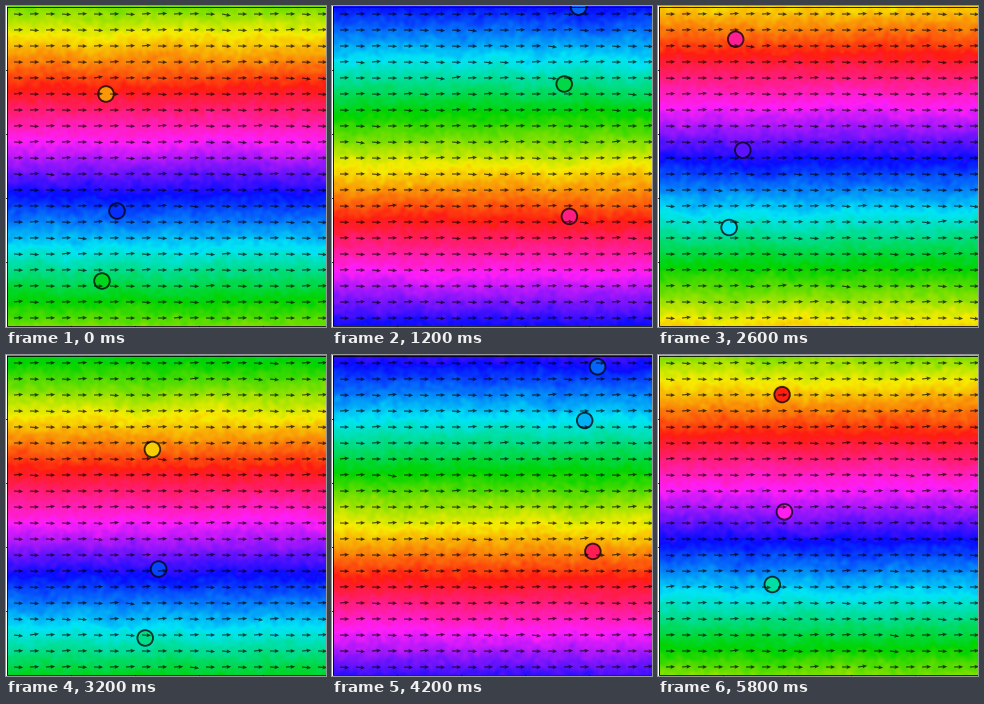
These frames come from a looping animation (320 px wide and 321 px high, 5.9 s). A matplotlib script:

```python
import numpy as np
import matplotlib.pyplot as plt
from matplotlib.animation import FuncAnimation
from matplotlib.patches import Circle

W, H, N = 320, 321, 59
SIZE = 320
RED_Y, SCROLL = 82, 11     # start of the red band, its fall in px per step
DRIFT_X, DRIFT_Y = 11.4, 10.3

WHEEL = np.array([(255, 28, 18), (246, 236, 0), (0, 212, 0), (0, 228, 245),
                  (8, 12, 255), (255, 30, 248), (255, 28, 18)]) / 255

# start, velocity, growing sway, and hue swing (size, period, peak)
TRACERS = [
    dict(x=111, y=205, vx=11.3, vy=10.15, sway=0.5, swing=(0.08, 10, 58)),
    dict(x=96, y=275, vx=11.35, vy=10.25, sway=0, swing=(-0.09, 12, 58)),
    dict(x=100, y=88, vx=11.45, vy=10.2, sway=0, swing=(0.14, 16.5, 51)),
]

rng = np.random.default_rng(4)


def smooth_noise(scale):
    """Periodic Gaussian noise with unit deviation."""
    f = np.fft.fftfreq(SIZE)
    blur = np.exp(-2 * (np.pi * scale) ** 2 * (f[:, None] ** 2 + f ** 2))
    field = np.fft.ifft2(np.fft.fft2(rng.normal(size=(SIZE, SIZE))) * blur).real
    field -= field.mean()
    return field / field.std()


def wheel(hue):
    pos = np.mod(hue, 1) * 6
    return np.stack([np.interp(pos, range(7), c) for c in WHEEL.T], axis=-1)


def band_hue(y, k):
    return (RED_Y + SCROLL * k - y) / SIZE


def tracer_state(p, k):
    x = p["x"] + p["vx"] * k
    y = p["y"] + p["vy"] * k - p["sway"] * k * np.sin(2 * np.pi * k / N)
    size, period, peak = p["swing"]
    swing = size * np.cos(2 * np.pi * (k - peak) / period)
    return x % SIZE, y % SIZE, swing


hue_noise = 0.006 * smooth_noise(2) + 0.004 * smooth_noise(12)
tilt_noise = 0.05 * smooth_noise(5)
rows = np.arange(SIZE)[:, None] + 0.5
cells = np.arange(8, SIZE, 16)
gx, gy = np.meshgrid(cells, cells)

fig = plt.figure(figsize=(W / 100, H / 100), dpi=100, facecolor="white")
ax = fig.add_axes([0, 0, 1, 1])
ax.set(xlim=(0, W), ylim=(H, 0))
ax.axis("off")

field = ax.imshow(np.zeros((SIZE, SIZE, 3)), extent=(1, W, SIZE, 0),
                  interpolation="nearest", aspect="auto", zorder=1)
rings = [ax.add_patch(Circle((0, 0), 7.8, ec=(0, 0, 0, 0.75), lw=1.35, zorder=2))
         for _ in TRACERS]
arrows = ax.quiver(gx, gy, np.ones(gx.shape), np.zeros(gx.shape),
                   angles="xy", scale_units="xy", scale=1, units="dots",
                   width=1.1, headwidth=3.6, headlength=4.2,
                   headaxislength=3.8, color="black", alpha=0.7, zorder=3)

# frame and outer ticks
edge = dict(color="black", lw=0.6, zorder=4)
ax.plot([1, 319.5, 319.5, 1, 1], [0.5, 0.5, 319.5, 319.5, 0.5], **edge)
for t in range(1, 5):
    ax.plot([64 * t + 1] * 2, [319.5, H], **edge)
    ax.plot([0, 1], [64 * t] * 2, **edge)


def update(k):
    shift = round(DRIFT_Y * k), round(DRIFT_X * k)
    hue = band_hue(rows, k) + np.roll(hue_noise, shift, (0, 1))
    field.set_data(wheel(hue))

    tilt = np.roll(tilt_noise, shift, (0, 1))[gy, gx]
    arrows.set_UVC(9.2 * np.cos(tilt), 9.2 * np.sin(tilt))

    for ring, p in zip(rings, TRACERS):
        x, y, swing = tracer_state(p, k)
        ring.center = x, y
        ring.set_facecolor(wheel(band_hue(y, k) + swing))
    return [field, arrows, *rings]


anim = FuncAnimation(fig, update, frames=N, interval=100, repeat=True,
                     repeat_delay=0, blit=False)
plt.show()
```
